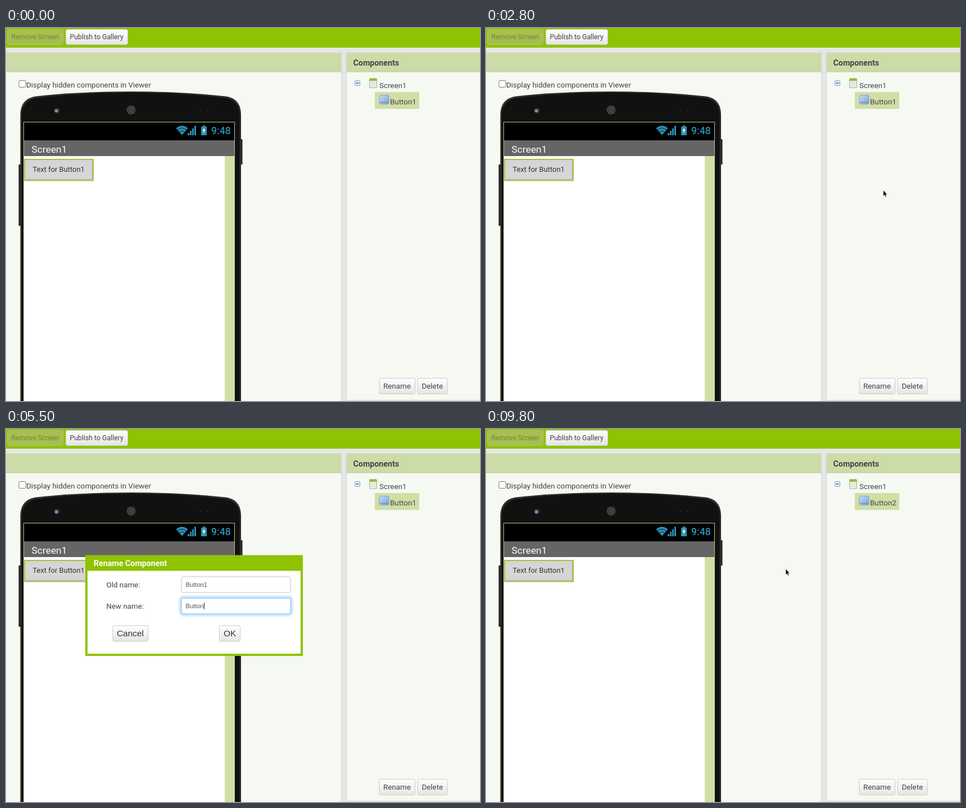
Recreate the animation shown at these times as an HTML page. Size 843 px wide and 664 px high, loop 9900 ms.

```html
<!DOCTYPE html>
<html lang="en">
<head>
<meta charset="utf-8">
<title>Rename a component</title>
<style>
  html, body { margin: 0; width: 100%; height: 100%; overflow: hidden; background: #e5e6e5; }
  svg { display: block; width: 843px; height: 664px; }
  text { font: 13.35px Roboto, sans-serif; fill: #444; white-space: pre; }
  .small { font-size: 12.3px; }
  .head { font-size: 14.25px; font-weight: 700; }
  .field { font: 11.2px "Liberation Sans", Arial, sans-serif; fill: #555; }
  .big { font: 15.4px "Liberation Sans", Arial, sans-serif; fill: #333; }
  .btn { fill: url(#btn); stroke: #c9ccc8; }
</style>
</head>
<body>
<svg viewBox="0 0 843 664">
  <defs>
    <linearGradient id="btn" x2="0" y2="1">
      <stop stop-color="#fff"/><stop offset="1" stop-color="#e4e5e4"/>
    </linearGradient>
    <linearGradient id="hover" x2="0" y2="1">
      <stop stop-color="#d4d5d4"/><stop offset="1" stop-color="#e8e8e8"/>
    </linearGradient>
    <linearGradient id="glass" x2="1" y2="1">
      <stop stop-color="#c6dbf5"/><stop offset="1" stop-color="#7ba2d6"/>
    </linearGradient>
    <filter id="glow" x="-10%" y="-50%" width="120%" height="200%">
      <feGaussianBlur stdDeviation="2.2"/>
    </filter>
  </defs>

  <!-- Page and panels -->
  <rect width="843" height="664" fill="#e5e6e6"/>
  <rect width="843" height="35" fill="#8fc202"/>
  <rect y="43.5" width="596" height="621" fill="#f5f9f1"/>
  <rect x="606" y="43.5" width="237" height="618.5" fill="#f5f9f1"/>
  <path d="M0 43.500H596V78H0ZM606 43.500H843V78H606Z" fill="#ccdca8"/>
  <path d="M0 78H596M606 78H843" stroke="#bac79c"/>
  <path d="M596.5 43V664M605.5 43V662M606 662.5H843" stroke="#d4d6d4" fill="none"/>
  <text class="head" x="617.5" y="66.5">Components</text>

  <!-- Toolbar -->
  <rect x="2.5" y="2.5" width="99" height="27" rx="3" fill="#a5bf50" stroke="#b0c968"/>
  <text class="small" x="9.5" y="20" style="fill:#71863a">Remove Screen</text>
  <rect class="btn" x="106.5" y="2.5" width="110" height="27" rx="3"/>
  <text class="small" x="113.5" y="20">Publish to Gallery</text>

  <rect x="23" y="93.5" width="12" height="12" rx="2" fill="#fff" stroke="#767676"/>
  <text x="36" y="106">Display hidden components in Viewer</text>

  <!-- Phone -->
  <path d="M22.500 243H27V352H22.500ZM416 198H420.500V243H416Z" fill="#262626"/>
  <path d="M25.500 664V154C26 134 36 124 54 121.500Q130 113 222 113T390 121.500C408 124 417.500 134 418 154V664Z" fill="#2b2c2b"/>
  <path d="M28 664V155C28.500 137 38 127 56 124.500Q130 115 222 115T388 124.500C406 127 415 137 415.500 155V664Z" fill="#111"/>
  <circle cx="90.500" cy="147" r="5" fill="#30383a"/>
  <circle cx="89.500" cy="147.500" r="2.600" fill="#87a0a5"/>
  <circle cx="222.500" cy="146" r="8" fill="#424242"/>
  <circle cx="222.500" cy="146" r="5" fill="none" stroke="#333" stroke-width="2" stroke-dasharray="2 2"/>
  <path d="M344 146.500h4M357 146.500h4" stroke="#252525" stroke-width="2"/>
  <rect x="32" y="168" width="374" height="496" fill="#fff"/>
  <rect x="32" y="168" width="374" height="32" fill="#000"/>
  <rect x="32" y="200" width="374" height="28" fill="#656565"/>
  <rect x="389" y="228" width="17" height="436" fill="#d0dfa6"/>
  <path d="M31.500 664V167.500H406.500V664" fill="none" stroke="#b9c68e"/>
  <g fill="#2b90b4">
    <path d="M302.500 178.500Q313 169.500 323.500 178.500L313 190.500Z"/>
    <path d="M305 181.500Q313 174.800 321 181.500M308.500 185Q313 181.500 317.500 185" fill="none" stroke="#000" stroke-width=".8"/>
    <path d="M323 187h3v4h-3zM327 183h3v8h-3zM331 178.500h3v12.500h-3zM335 174h3v17h-3z"/>
    <path d="M347 175.500h3v-2h4v2h3v15.500h-10z"/>
    <path d="M353.500 177l-4.500 6h2.500l-1 5 4.500-6.500h-2.500z" fill="#fff"/>
  </g>
  <text x="365" y="188.500" style="font-size:17.600px;font-weight:500;fill:#2b90b4">9:48</text>
  <text x="45.500" y="221.500" style="font-size:17.400px;fill:#fff">Screen1</text>
  <rect x="33" y="234" width="122" height="37.500" fill="#d5d6d5" stroke="#a0c53c" stroke-width="2"/>
  <path d="M35.500 269.500H153.500V236" fill="none" stroke="#aaa"/>
  <text x="47.500" y="256" style="font-size:12.900px;fill:#333">Text for Button1</text>

  <!-- Component tree -->
  <rect id="rowHover" x="638" y="85" width="79" height="29" fill="#d0dfa6"/>
  <rect x="656" y="114" width="79" height="30" fill="#d0dfa6"/>
  <rect x="620.500" y="93.500" width="9" height="9" rx="2" fill="#e4eefa" stroke="#7a9bc4"/>
  <path d="M622.500 98h5" stroke="#345f98" stroke-width="1.500"/>
  <rect x="646.500" y="90" width="13" height="16.500" rx="1.500" fill="#e6e8e3" stroke="#b0b3a9"/>
  <path d="M646 94v-2.500q0-2 2-2h10q2 0 2 2V94z" fill="#9bb83c"/>
  <rect x="664" y="119.500" width="17" height="16" rx="2" fill="url(#glass)" stroke="#88a4cc"/>
  <path d="M666 132.500h14" stroke="#668fc8" stroke-width="1.500"/>
  <text x="664" y="106.500">Screen1</text>
  <text id="treeName" x="683" y="136"></text>
  <rect class="btn" x="664" y="623.500" width="63.500" height="28" rx="3"/>
  <text x="671" y="641.500">Rename</text>
  <rect class="btn" x="732" y="623.500" width="53" height="28" rx="3"/>
  <text x="739.500" y="641.500">Delete</text>

  <!-- Rename dialog -->
  <g id="dialog">
    <rect x="141" y="224.500" width="387" height="179.500" fill="#8fc202"/>
    <rect x="145" y="252.500" width="379" height="147.500" fill="#fff"/>
    <text class="head" x="156" y="243.500" style="fill:#fff">Rename Component</text>
    <text x="178.500" y="281.500">Old name:</text>
    <text x="178.500" y="319.500">New name:</text>
    <rect x="312" y="263" width="194" height="28" rx="3.500" fill="#fff" stroke="#c4c4c4"/>
    <text class="field" x="319.500" y="281">Button1</text>
    <rect x="311" y="300" width="196" height="30" rx="4" fill="none" stroke="#a9d3f5" stroke-width="4" filter="url(#glow)"/>
    <rect x="312" y="301" width="194" height="28" rx="3.500" fill="#fff" stroke="#7cb8ea"/>
    <rect id="selection" x="319.500" y="309" width="39" height="13" fill="#3b8ae0"/>
    <text id="newName" class="field" x="319.500" y="319"></text>
    <path id="caret" d="M0 309V321" stroke="#222"/>
    <rect class="btn" x="190" y="350" width="63" height="28" rx="3"/>
    <text class="big" x="197" y="369">Cancel</text>
    <rect id="ok" class="btn" x="379.500" y="350" width="37" height="28" rx="3"/>
    <text class="big" x="387" y="369">OK</text>
  </g>

  <!-- Pointers, each with its hot spot at 0,0 -->
  <path id="arrow" d="M0 0V10.500L2.400 8.400L4 12L5.800 11.200L4.200 7.700H7.200Z" fill="#111" stroke="#fff" stroke-width=".5"/>
  <path id="hand" d="M-1.300 1Q0-.8 1.300 1V4.500L6.500 6Q7.500 6.500 7 9L5.500 13H-.5L-4 8.500Q-4.800 7-3.300 6.700L-1.300 8Z" fill="#111" stroke="#fff" stroke-width=".5"/>
  <path id="beam" d="M-3-6.500H-1L0-5.500L1-6.500H3M0-5.500V5.500M-3 6.500H-1L0 5.500L1 6.500H3" fill="none" stroke="#555"/>
</svg>
<script>
  const LOOP = 9900, OPEN = 3500, CLOSE = 8200;
  const DESELECT = 5200, ERASE = 5500, TYPE = 5700, BLINK = 600;
  const el = id => document.getElementById(id);
  const show = (id, on) => el(id).setAttribute('visibility', on ? 'visible' : 'hidden');
  const within = (v, a, b) => v >= a && v < b;

  // resting points of the pointer: time, x, y
  const path = [
    [100, 850, 300], [1500, 712, 99], [2100, 711, 129], [2500, 711, 129],
    [3300, 697, 634], [3500, 697, 634], [4200, 414, 323], [4400, 412, 320],
    [7100, 412, 320], [7900, 398, 371], [8400, 398, 371], [8700, 410, 360],
    [8900, 410, 360], [9400, 533, 249], [LOOP, 533, 249]
  ];

  function pointAt(t) {
    const i = path.findIndex(row => row[0] > t);
    if (i === 0) return path[0].slice(1);
    const [t0, x0, y0] = path[i - 1], [t1, x1, y1] = path[i];
    const k = (t - t0) / (t1 - t0);
    const ease = k * k * (3 - 2 * k);
    return [x0 + (x1 - x0) * ease, y0 + (y1 - y0) * ease];
  }

  function pointerKind(t, x, y, open) {
    if (t < 200 || within(t, DESELECT, 7200)) return '';
    if (open) {
      if (within(x, 312, 506) && within(y, 301, 329)) return 'beam';
      return within(x, 379, 417) && within(y, 350, 378) ? 'hand' : 'arrow';
    }
    const onRow = within(x, 638, 735) && within(y, 85, 144);
    const onRename = within(x, 664, 728) && within(y, 623, 652);
    return onRow || onRename ? 'hand' : 'arrow';
  }

  function nameAt(t) {
    if (t < ERASE) return 'Button1';
    return t < TYPE ? 'Button' : 'Button2';
  }

  // The caret stays on while typing, then blinks.
  function caretOn(t) {
    if (t < TYPE) return t >= DESELECT;
    return Math.floor((t - TYPE) / BLINK) % 2 === 0;
  }

  function render(now) {
    const t = Math.floor(now % LOOP / 100) * 100;
    const open = within(t, OPEN, CLOSE);
    const [x, y] = pointAt(t);
    const kind = pointerKind(t, x, y, open);
    const name = nameAt(t);
    const selected = t < DESELECT;
    const onOk = open && kind === 'hand';

    el('dialog').style.display = open ? '' : 'none';
    el('treeName').textContent = t < CLOSE ? 'Button1' : 'Button2';
    show('rowHover', kind === 'hand' && y < 114);

    el('newName').textContent = name;
    el('newName').style.fill = selected ? '#fff' : '#555';
    el('selection').style.display = selected ? '' : 'none';
    el('caret').style.display = caretOn(t) ? '' : 'none';
    el('caret').setAttribute('transform', `translate(${name.length > 6 ? 358.5 : 352.5})`);
    el('ok').style.fill = onOk ? 'url(#hover)' : '';
    el('ok').style.stroke = onOk ? '#aaa' : '';

    for (const id of ['arrow', 'hand', 'beam']) {
      show(id, id === kind);
      el(id).setAttribute('transform', `translate(${x} ${y})`);
    }
  }

  const start = performance.now();
  function tick() {
    render(performance.now() - start);
    requestAnimationFrame(tick);
  }
  tick();
</script>
</body>
</html>
```
